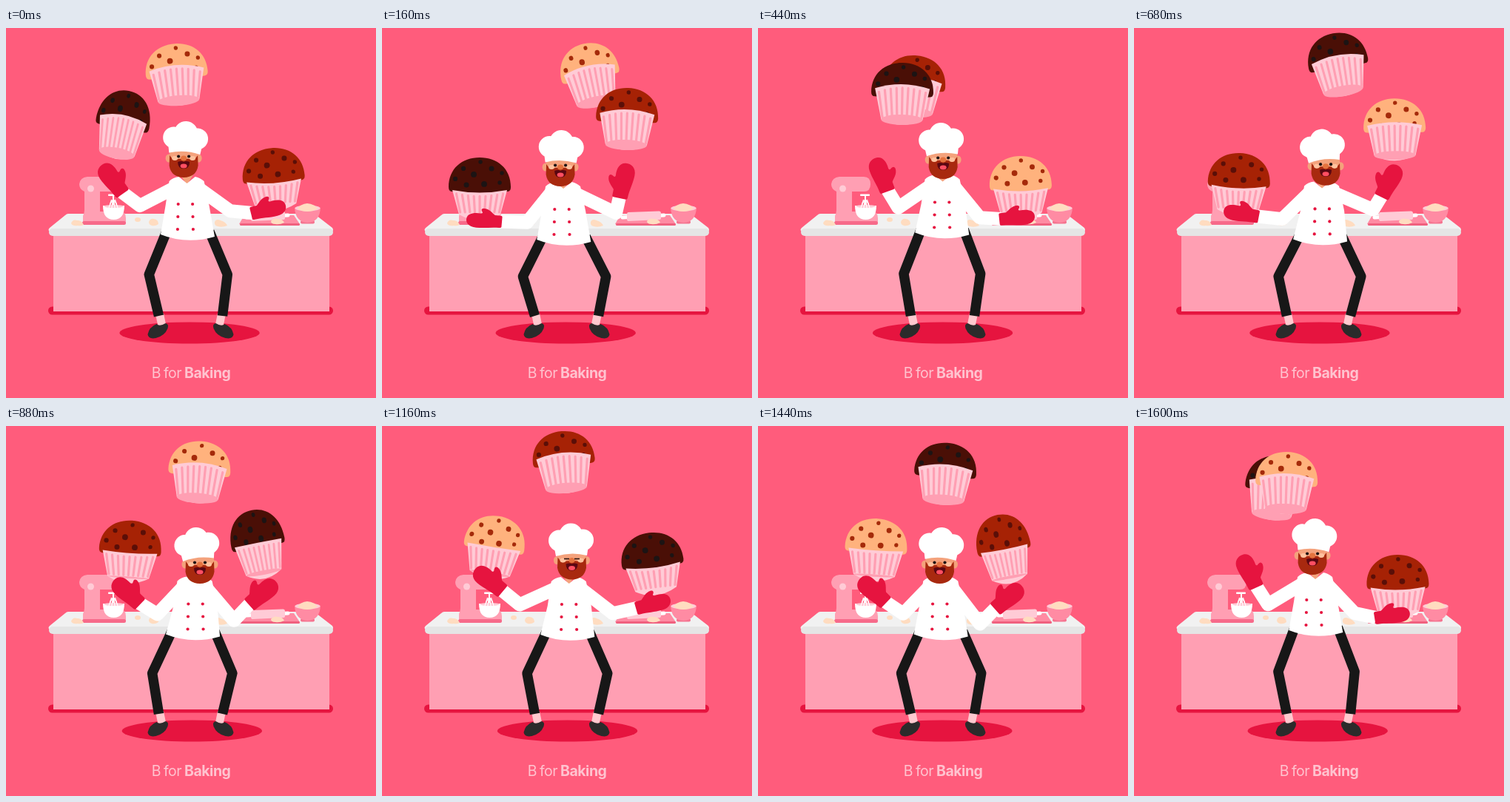
Animation, 500 px wide and 500 px high, one loop 1.64 s. Source, as an HTML page with a canvas:

```html
<!DOCTYPE html>
<html lang="en">
<head>
<meta charset="utf-8">
<title>B for Baking</title>
<style>
  html, body { margin: 0; width: 100%; height: 100%; overflow: hidden; background: #ff5c7c; }
  canvas { position: absolute; left: 0; top: 0; width: 500px; height: 500px; }
  p { position: absolute; left: 0; top: 454px; width: 500px; margin: 0; text-align: center;
      font: 400 19.5px/24px Inter, sans-serif; letter-spacing: -.5px; word-spacing: -1px; color: #ffc3cf; }
  b { font-weight: 700; }
</style>
</head>
<body>
<canvas id="stage"></canvas>
<p>B for <b>Baking</b></p>
<script>
const STEP = 40, STEPS = 41, LAP = 42, BEAT = 14;
const WHITE = '#fff', ROSE = '#ff9fb3', PALE = '#ffcbd6', RED = '#e6143f', SKIN = '#f4a27c', FLOUR = '#ffdcc0';

// One lap of a muffin: step, x, y, tilt, width factor
const PATH = [
  [0, 367.4, 199.7, -4, 1], [1, 363.3, 189.6, -7, 1], [4, 336, 120.1, 2, 1],
  [8, 255.6, 65, 4, 1], [11, 211.4, 80, 5, 1], [12, 195, 85.5, 7, .96],
  [14, 162.4, 133.7, 11, .87], [15, 148.3, 163.9, 9, .98], [18, 137, 220.3, 0, 1],
  [22, 162, 169, 4, 1], [25, 195.4, 90, 1, 1], [26, 211, 78, 2, 1],
  [28, 236.4, 63.2, -4, 1], [29, 243.3, 50.5, -5, 1], [32, 287, 62.7, -12, .95],
  [36, 335.6, 165, -11, .87], [39, 355.4, 215.6, -1, 1], [40, 361.5, 212.3, -1, 1]
];
// One beat of an arm: step, wrist x, y, elbow x, y, mitten direction
const LEFT = [
  [0, 162.4, 223.8, 186.4, 241, -125], [1, 159.3, 221, 183.3, 241, -140],
  [4, 165, 263, 201, 263, -175], [8, 174.6, 238, 199, 254, -136],
  [11, 175.4, 219, 190, 243, -110], [12, 170, 217.5, 186, 242, -114]
];
const RIGHT = [
  [0, 338.4, 245.7, 308.4, 244, -14], [1, 342.3, 248, 309.3, 255, -16],
  [4, 326, 224.4, 321, 246.6, -78], [8, 324.2, 244, 302.6, 266, -42],
  [11, 328.4, 257.7, 300, 256, -6], [12, 332, 255.3, 303, 250, -9]
];
// Top of the hat and hem of the jacket
const BODY = [
  [0, 126, 287], [1, 131.5, 290], [4, 138, 294], [8, 137, 289.5], [11, 128, 284.5], [12, 125, 284]
];
const MUFFINS = [
  { shift: 0, cap: '#a62205', chip: '#5a0f08' },
  { shift: 14, cap: '#4a0f06', chip: '#1c1414' },
  { shift: 28, cap: '#ffb27d', chip: '#a52a0a' }
];
const CHIPS = [[1, -37], [-22, -28], [16, -28], [-8, -20], [30, -22], [-33, -14], [-18, -6], [6, -7], [27, -9]];

const canvas = document.getElementById('stage');
const g = canvas.getContext('2d');
const ratio = Math.max(1, window.devicePixelRatio || 1);
canvas.width = canvas.height = 500 * ratio;

const mix = (a, b, k) => a + (b - a) * k;
const clamp = v => Math.min(1, Math.max(0, v));
const rad = deg => deg * Math.PI / 180;

// Smooth periodic curve through keyed rows
function sample(rows, at, period) {
  const n = rows.length;
  const key = i => {
    const lap = Math.floor(i / n);
    return { t: rows[i - lap * n][0] + lap * period, v: rows[i - lap * n] };
  };
  let i = n - 1;
  while (rows[i][0] > at) i--;
  const [a, b, c, d] = [key(i - 1), key(i), key(i + 1), key(i + 2)];
  const span = c.t - b.t, u = (at - b.t) / span, u2 = u * u, u3 = u2 * u;
  return b.v.slice(1).map((_, j) => {
    const k = j + 1;
    const m0 = (c.v[k] - a.v[k]) / (c.t - a.t) * span;
    const m1 = (d.v[k] - b.v[k]) / (d.t - b.t) * span;
    return (2 * u3 - 3 * u2 + 1) * b.v[k] + (u3 - 2 * u2 + u) * m0
      + (3 * u2 - 2 * u3) * c.v[k] + (u3 - u2) * m1;
  });
}

function fill(color, d) { g.fillStyle = color; g.fill(new Path2D(d)); }
function oval(color, x, y, rx, ry = rx, turn = 0) {
  g.fillStyle = color;
  g.beginPath();
  g.ellipse(x, y, rx, ry, turn, 0, 7);
  g.fill();
}
function box(color, x, y, w, h, r = 0) {
  g.fillStyle = color;
  g.beginPath();
  g.roundRect(x, y, w, h, r);
  g.fill();
}
function line(color, width, points, cap = 'butt') {
  g.strokeStyle = color;
  g.lineWidth = width;
  g.lineCap = cap;
  g.lineJoin = 'round';
  g.beginPath();
  points.forEach(p => g.lineTo(p[0], p[1]));
  g.stroke();
}
function at(x, y, turn, draw, sx = 1, sy = 1) {
  g.save();
  g.translate(x, y);
  g.rotate(rad(turn));
  g.scale(sx, sy);
  draw();
  g.restore();
}

function kitchen() {
  box('#ff5c7c', 0, 0, 500, 500);
  box(RED, 57, 376.5, 385, 11, 5.5);
  box(ROSE, 64, 278, 373, 105);
  fill('#f1f1f1', 'M84 251H414Q417 251 419 253L441 270Q443 273 441 275H59Q56 273 59 270L80 253Q82 251 84 251Z');
  box('#e5e5e5', 58, 271, 384, 10, 5);
  // mixer
  fill(ROSE, 'M110 201H143Q152 201 152 211Q152 221 143 221H127V248H156Q162 249 162 257V263H104V254Q106 250 106 246V221Q99 218 99 211Q100 202 110 201Z');
  box('#f76a8a', 103, 261, 59, 5, 2.5);
  oval(PALE, 114.5, 217, 4.5);
  box(WHITE, 138, 224.5, 13, 2.5, 1);
  fill(WHITE, 'M131 240H160Q160 259 145.500 259Q131 259 131 240Z');
  line(WHITE, 2, [[145, 226], [145, 242]]);
  [-4, 4].forEach(k => line(WHITE, 1.3, [[145, 232], [145 + k, 237], [145 + k, 242]]));
  oval(PALE, 145.5, 241, 13, 2);
  [-6, -2, 2, 6].forEach(k => line(WHITE, 1.2, [[145 + k * .4, 232], [145 + k, 243]]));
  // flour and dough
  fill(FLOUR, 'M88 264Q90 258 96 260Q102 259 105 266Q101 268 97 267Q90 268 88 264Z');
  oval(FLOUR, 178, 259, 4, 3);
  fill(FLOUR, 'M193 262Q195 257 200 258Q206 259 206 265Q202 268 197 267Q193 266 193 262Z');
  fill(FLOUR, 'M282 262Q284 257 290 260Q297 262 299 267Q292 270 286 268Q281 267 282 262Z');
  // tray and rolling pin
  fill('#ff8ba3', 'M322 253H389L397 265H315Z');
  box('#f0617f', 316, 264, 81, 3, 1.5);
  line(WHITE, 5, [[325, 256], [381, 253]], 'round');
  fill(PALE, 'M333 249L374 247.500Q377 247 377 250V257Q377 259 374 259L333 261Q331 261 331 258V252Q331 249 333 249Z');
  fill(FLOUR, 'M358 261Q362 256 367 258Q374 258 376 263Q370 266 364 265Q358 265 358 261Z');
  // bowl
  box('#f5738f', 398, 260, 19, 4.5, 2);
  fill('#ff8ba3', 'M390 243Q398 239 407 240Q418 239 425 243Q424 262 407.500 263Q391 262 390 243Z');
  oval(PALE, 407.5, 243.5, 17, 4);
  fill(FLOUR, 'M394 244Q398 238 407 237Q417 238 421 244Q415 248 407 248Q399 248 394 244Z');
}

function muffin(m, x, y, tilt, wide) {
  const low = clamp((180 - y) / 50);
  at(x, y, tilt, () => {
    fill(m.cap, 'M-42 -3C-42 -28 -24 -43 0 -43C24 -43 42 -28 42 -3Q42 3 37 3Q0 7 -37 3Q-42 3 -42 -3Z');
    CHIPS.forEach(([cx, cy], i) => oval(m.chip, cx, cy, 2.7 + (i * 5 % 4) * .4));
    const edge = mix(1, -8, low), arch = mix(8, -20, low);
    const base = 34, dip = mix(42, 40, low);
    const cup = new Path2D(`M-37 ${edge}Q0 ${arch} 37 ${edge}L28 ${base}Q0 ${dip + 8} -28 ${base}Z`);
    g.fillStyle = PALE;
    g.fill(cup);
    g.save();
    g.clip(cup);
    for (let i = -4; i <= 4; i++) {
      const top = mix(edge, (edge + arch) / 2, 1 - i * i / 16) + 5;
      line(ROSE, 3.2, [[i * 7.9, top], [i * 6.6, 31]], 'round');
    }
    g.restore();
    if (low > .05) oval(ROSE, 0, 34, 28, 7 * low);
  }, wide, 1 / Math.sqrt(wide) * mix(1, 1.04, clamp((1 - wide) * 8)));
}

function mitten(x, y, dir, side) {
  const thick = .75 + .25 * clamp(Math.abs(Math.sin(rad(dir))) * 1.6);
  at(x, y, dir, () => fill(RED,
    'M-2 -9Q-2 -11 1 -11C12 -11 20 -14 32 -14C43 -14 47 -6 46 1C45 9 37 12 27 11' +
    'Q25 11 25 13Q29 19 24 20C16 20 12 13 8 10H0Q-2 10 -2 8Z'), 1, side * thick);
}

function shoe(flip) {
  at(249.5, 0, 0, () => {
    line('#ffc9cf', 11, [[-42, 386], [-38.5, 403]]);
    fill('#2b2b2b', 'M-46 400Q-42 404 -34 399Q-29 400 -31 406Q-35 416 -47 419Q-57 421 -58 414Q-56 404 -46 400Z');
  }, flip);
}

function head(hatX, faceX, top, blink) {
  at(faceX, top, 0, () => {
    oval(SKIN, -20, 50, 4.5, 5.5);
    oval(SKIN, 20, 50, 4.5, 5.5);
    box(SKIN, -19, 34, 38, 30, 6);
    fill('#a8290f', 'M-19 46Q-15 52 -12 53Q-6 49 0 52Q6 49 12 53Q15 52 19 46L19.500 60Q17 75.500 0 76Q-17 75.500 -19.500 60Z');
    oval('#ffc29e', -12, 50, 4, 3);
    oval('#ffc29e', 12, 50, 4, 3);
    oval('#e5743f', 0, 50, 4, 3.5);
    for (const x of [-7, 7]) {
      if (blink) line('#2a1410', 1.6, [[x - 3.5, 48], [x + 3.5, 48]]);
      else oval('#1d1414', x, 47.5, 2.1);
    }
    fill('#5a0712', 'M-8 55Q-3 53 0 55Q3 53 8 55Q8 64 0 64Q-8 64 -8 55Z');
    oval('#ff4f63', 0, 60.5, 4.5, 3);
  });
  const lean = (hatX - faceX) * .9;
  at(hatX, top, lean, () => {
    oval(WHITE, 0, 16, 16);
    oval(WHITE, -16, 23, 14.5);
    oval(WHITE, 16, 23, 14.5);
    fill(WHITE, 'M-24 26H24L21 44Q0 38 -21 44Z');
  });
}

function draw(n) {
  const sway = k => -5.5 * Math.cos(2 * Math.PI * (k - 1) / LAP);
  const s = sway(n);
  const place = (x, y) => [x + s, y - s * (.24 + .0063 * (x - 250))];
  const beat = n % BEAT;
  const [top, hem] = sample(BODY, beat, BEAT);
  const c = 249 + s, h = 249.5 + .65 * s;

  g.setTransform(ratio, 0, 0, ratio, 0, 0);
  kitchen();
  oval(RED, 249.7 + .3 * s, 412, 94.7, 14.5);

  const bend = 53 + (hem - 287) * .45, knee = 333 + (hem - 287) * .4;
  for (const k of [-1, 1]) {
    shoe(-k);
    line('#171717', 13.5, [[h + k * 29, hem - 12], [249 + .5 * s + k * bend, knee], [249.5 + k * 43, 389]]);
  }

  // rising muffins pass in front of falling ones
  MUFFINS.map(m => ({ m, q: (n + m.shift) % LAP }))
    .sort((a, b) => b.q % 21 - a.q % 21)
    .forEach(({ m, q }) => {
      const [x, y, tilt, wide] = sample(PATH, q, LAP);
      muffin(m, ...place(x, y), tilt, wide);
    });

  const arms = [LEFT, RIGHT].map((rows, i) => {
    const [wx, wy, ex, ey, dir] = sample(rows, beat, BEAT);
    const side = i ? -1 : 1;
    return { wrist: place(wx, wy), elbow: place(ex, ey), dir, side, shoulder: [c - side * 16, hem - 71] };
  });
  for (const a of arms) line(WHITE, 18, [a.shoulder, a.elbow, a.wrist]);

  fill(SKIN, `M${c - 9} ${hem - 90}H${c + 10}L${c + 1} ${hem - 75}Z`);
  fill(WHITE, `M${c - 10} ${hem - 86}Q${c - 18} ${hem - 85} ${c - 23} ${hem - 80}L${c - 28} ${hem - 47}` +
    `L${h - 37} ${hem - 8}Q${h - 2} ${hem + 6} ${h + 36} ${hem - 5}L${c + 31} ${hem - 47}` +
    `L${c + 24} ${hem - 80}Q${c + 18} ${hem - 85} ${c + 12} ${hem - 86}L${c + 1} ${hem - 77}Z`);
  for (let row = 0; row < 3; row++)
    for (const k of [-1, 1])
      oval(RED, 249.2 + 1.25 * s + k * (9.7 + row * .4), hem - 49 + row * 17, 2.1);

  head(249.5 + 1.2 * sway(n - 3), 251 + 2 * s, top, Math.abs(n - 29) < 2);
  for (const a of arms) mitten(...a.wrist, a.dir, a.side);
}

const start = performance.now();
let shown = -1;
function tick(now) {
  const n = Math.floor(Math.max(0, now - start) / STEP) % STEPS;
  if (n !== shown) draw(shown = n);
  requestAnimationFrame(tick);
}
tick(start);
</script>
</body>
</html>
```
